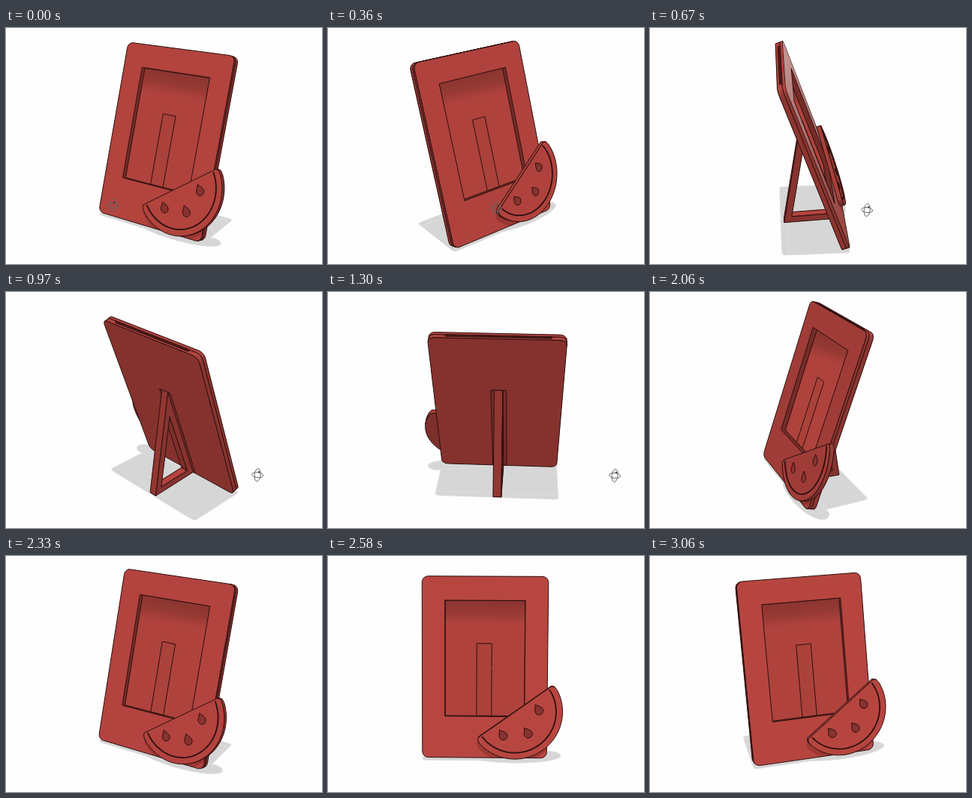
Recreate the animation shown at these times as an HTML page with a canvas. Size 421x315 px, loop 3.09 s.

```html
<!DOCTYPE html>
<html lang="en">
<head>
<meta charset="utf-8">
<title>Photo stand turntable</title>
<style>
  html, body { margin: 0; width: 100%; height: 100%; overflow: hidden; background: #fefefe; }
  canvas { display: block; }
</style>
</head>
<body>
<canvas id="stage" width="421" height="315"></canvas>
<script>
const ctx = document.getElementById('stage').getContext('2d');
const LOOP = 3090, DISTANCE = 880, GROUND = -109, LINE = '#2b100f';
const RAD = Math.PI / 180, LEAN = 19 * RAD;

// time, yaw, pitch, cursor x, cursor y
const KEYS = [
  [0, 33, 20, 142, 237],
  [670, -93.5, 28.3, 289, 243],
  [1300, -176.5, 28, 382, 245],
  [1640, -232, 28, 450, 246],
  [2060, -294, 24, 450, 246],
  [2580, -359, 23, 450, 246],
  [2850, -377, 24.5, 450, 246],
  [3060, -375, 25, 450, 246]
];

// Smooth curve through the keys, one column at a time
function sample(t, col) {
  const last = KEYS.length - 1;
  let i = 0;
  while (i < last - 1 && t > KEYS[i + 1][0]) i++;
  const slope = k => {
    const a = KEYS[Math.max(k - 1, 0)], b = KEYS[Math.min(k + 1, last)];
    return (b[col] - a[col]) / (b[0] - a[0]);
  };
  const [a, b] = [KEYS[i], KEYS[i + 1]], span = b[0] - a[0];
  const s = Math.min((t - a[0]) / span, 1), r = 1 - s;
  return a[col] * r * r * (1 + 2 * s) + b[col] * s * s * (3 - 2 * s)
    + span * s * r * (slope(i) * r - slope(i + 1) * s);
}

// Geometry: u across the plate, v up along it, n out of its front
const place = (u, v, n) => [
  u,
  v * Math.cos(LEAN) + n * Math.sin(LEAN),
  n * Math.cos(LEAN) - v * Math.sin(LEAN)
];
const lift = (shape, n) => shape.map(([u, v]) => place(u, v, n));
const rect = (l, b, r, t) => [[l, b], [r, b], [r, t], [l, t]];

function arc(cx, cy, r, from, to, steps) {
  return Array.from({ length: steps + 1 }, (_, i) => {
    const a = (from + (to - from) * i / steps) * RAD;
    return [cx + r * Math.cos(a), cy + r * Math.sin(a)];
  });
}

const plate = [
  ...arc(-84, -104.5, 8, 180, 270, 5), ...arc(66, -104.5, 8, 270, 360, 5),
  ...arc(66, 120.5, 8, 0, 90, 5), ...arc(-84, 120.5, 8, 90, 180, 5)
];
const SLICE_TOP = 11, R = 63, TILT = 35.5 * RAD;
const onSlice = ([p, q]) => [
  31 + p * Math.cos(TILT) - q * Math.sin(TILT),
  -50 + p * Math.sin(TILT) + q * Math.cos(TILT)
];
const slice = [
  ...arc(0, 0, R, 188, 352, 28),
  [R * .985, -3], [R * .94, 0], [-R * .94, 0], [-R * .985, -3]
].map(onSlice);
const rind = arc(0, 0, 54.5, 182, 358, 28).map(onSlice);
const seeds = [[16, -82], [49, -79], [63, -48]].map(([u, v]) =>
  [[u - 5, v + 8], ...arc(u, v, 5.5, 180, 430, 12)]);

const legOuter = [[42, -5], [-112.5, -5], [-92, -76]];
const legInner = legOuter.map(([v, n]) => [-74 + .69 * (v + 74), -33.8 + .69 * (n + 33.8)]).reverse();
const legAt = (shape, u) => shape.map(([v, n]) => place(u, v, n));

const plateBack = lift(plate, -5), plateSeam = lift(plate, 1), plateFront = lift(plate, 5);
const sliceBack = lift(slice, 5), sliceFront = lift(slice, SLICE_TOP);
const topSlot = [[-2, -74], [1, -74], [1, 53], [-2, 53]].map(([n, u]) => place(u, 128.5, n));
const opening = rect(-62, -57, 44, 97);

// Camera
let yaw = 0, pitch = 0;
function project([x, y, z]) {
  const side = x * Math.cos(yaw) - z * Math.sin(yaw);
  const near = x * Math.sin(yaw) + z * Math.cos(yaw);
  const up = y * Math.cos(pitch) - near * Math.sin(pitch);
  const depth = y * Math.sin(pitch) + near * Math.cos(pitch);
  const s = DISTANCE / (DISTANCE - depth);
  return [218 + side * s, 157 - up * s];
}
const view = points => points.map(project);
const facing = pts => pts.reduce((sum, [x, y], i) => {
  const [x2, y2] = pts[(i + 1) % pts.length];
  return sum + x * y2 - x2 * y;
}, 0) < 0;

// Drawing
const shade = k => `rgb(${[188, 71, 65].map(c => Math.round(c * k)).join()})`;

function trace(pts, closed = true) {
  pts.forEach(([x, y], i) => i ? ctx.lineTo(x, y) : ctx.moveTo(x, y));
  if (closed) ctx.closePath();
}
function draw(pts, fill, stroke = LINE, width = 1, closed = true) {
  ctx.beginPath();
  trace(pts, closed);
  if (fill) { ctx.fillStyle = fill; ctx.fill(); }
  if (stroke) { ctx.strokeStyle = stroke; ctx.lineWidth = width; ctx.stroke(); }
}
const edge = (a, b) => draw([a, b], null, LINE, 1, false);

function clipped(pts, paint) {
  ctx.save();
  ctx.beginPath();
  trace(pts);
  ctx.clip();
  paint();
  ctx.restore();
}

// Gradient running down the plate between two heights
function downPlate(top, bottom, n, ...stops) {
  const fade = ctx.createLinearGradient(...project(place(-9, top, n)), ...project(place(-9, bottom, n)));
  stops.forEach((color, i) => fade.addColorStop(i / (stops.length - 1), color));
  return fade;
}

function wallTone(a, b, c) {
  const [p, q] = [b, c].map(e => e.map((x, i) => x - a[i]));
  const n = [p[1] * q[2] - p[2] * q[1], p[2] * q[0] - p[0] * q[2], p[0] * q[1] - p[1] * q[0]];
  return shade(.74 + .22 * n[1] / Math.hypot(...n));
}

// Side faces between two matching outlines
function walls(bottom, top) {
  const B = view(bottom), T = view(top), count = B.length, sharp = count < 6;
  const quads = B.map((p, i) => {
    const j = (i + 1) % count;
    return [p, B[j], T[j], T[i]];
  });
  const seen = quads.map(facing);
  quads.forEach((quad, i) => {
    if (!seen[i]) return;
    const tone = wallTone(bottom[i], bottom[(i + 1) % count], top[i]);
    draw(quad, tone, tone, .6);
  });
  quads.forEach(([a, b, c, d], i) => {
    if (!seen[i]) return;
    edge(a, b);
    edge(c, d);
    if (sharp || !seen[(i + count - 1) % count]) edge(a, d);
    if (sharp || !seen[(i + 1) % count]) edge(b, c);
  });
}

function drawShadow() {
  const flat = pts => view(pts.map(([x, , z]) => [x, GROUND, z]));
  [plateBack, plateFront, sliceFront].forEach(s => draw(flat(s), '#d6d6d6', '#dedede'));
}

function drawLeg() {
  const left = -15.5, right = -4.5;
  walls(legAt(legInner, left), legAt(legInner, right));
  walls(legAt(legOuter, left), legAt(legOuter, right));
  const rightSeen = facing(view(legAt(legOuter, right)));
  const leftSeen = !facing(view(legAt(legOuter, left)));
  if (!rightSeen && !leftSeen) return;
  const u = rightSeen ? right : left;
  ctx.beginPath();
  trace(view(legAt(legOuter, u)));
  trace(view(legAt(legInner, u)));
  ctx.fillStyle = shade(.72);
  ctx.fill('evenodd');
  ctx.strokeStyle = LINE;
  ctx.stroke();
}

function drawRecess() {
  const hole = view(lift(opening, 5));
  clipped(hole, () => {
    draw(hole, shade(.62), null);
    draw(view(lift(opening, -2)), downPlate(97, 66, -2, shade(.74), shade(.8), shade(.93)));
    draw(view(lift(rect(-20, -57, 0, 40), -2)), shade(.91));
  });
  draw(hole, null);
}

function drawPlate(frontSeen, turn, tone) {
  walls(plateBack, plateSeam);
  walls(plateSeam, plateFront);
  const slot = view(topSlot);
  if (facing(slot)) draw(slot, shade(.42));
  if (frontSeen) {
    const face = view(plateFront);
    draw(face, tone);
    // pale sheen when the front is seen at a grazing angle
    const sheen = Math.max(0, 1 - turn / .45);
    const pale = k => `rgba(212,178,174,${k * sheen})`;
    draw(face, downPlate(128, -112, 5, pale(.95), pale(.2)), null);
    clipped(face, () => {
      const under = slice.map(([u, v]) => [u - 2, v - 7]);
      draw(view(lift(under, 5)), 'rgba(70,10,10,.22)', null);
    });
    drawRecess();
  } else if (!facing(view(plateBack))) {
    draw(view(plateBack), shade(.71));
    draw(view(lift(rect(-20, -112.5, 0, 42), -5)), shade(.62));
  }
}

function drawSlice(tone) {
  walls(sliceBack, sliceFront);
  const face = view(sliceFront);
  if (facing(face)) {
    draw(face, tone);
    draw(view(lift(rind, SLICE_TOP)), null, LINE, 1.8, false);
    seeds.forEach(s => draw(view(lift(s, SLICE_TOP)), shade(.72)));
  } else if (!facing(view(sliceBack))) {
    draw(view(sliceBack), shade(.66));
  }
}

function drawCursor(x, y) {
  ctx.strokeStyle = '#666';
  ctx.lineWidth = 1;
  for (const [rx, ry] of [[7.5, 3.4], [4, 8.5]]) {
    ctx.beginPath();
    ctx.ellipse(x, y, rx, ry, .12, 0, 2 * Math.PI);
    ctx.stroke();
  }
  ctx.fillStyle = '#333';
  ctx.fillRect(x + 1, y - 5, 2, 2);
}

function render(t) {
  yaw = sample(t, 1) * RAD;
  pitch = sample(t, 2) * RAD;
  ctx.fillStyle = '#fefefe';
  ctx.fillRect(0, 0, 421, 315);
  ctx.lineJoin = 'round';

  const turn = Math.sin(LEAN) * Math.sin(pitch) + Math.cos(LEAN) * Math.cos(yaw) * Math.cos(pitch);
  const tone = shade(.73 + .25 * turn);
  const frontSeen = facing(view(plateFront));
  const parts = [drawLeg, () => drawPlate(frontSeen, turn, tone), () => drawSlice(tone)];
  drawShadow();
  (frontSeen ? parts : parts.reverse()).forEach(part => part());

  // orbit pivot mark
  if (t > 2000 && t < 2700) {
    ctx.fillStyle = '#6b4a40';
    ctx.fillRect(217, 149, 2, 2);
  }
  drawCursor(sample(t, 3), sample(t, 4));
}

const start = performance.now();
function tick() {
  render((performance.now() - start) % LOOP);
  requestAnimationFrame(tick);
}
tick();
</script>
</body>
</html>
```
